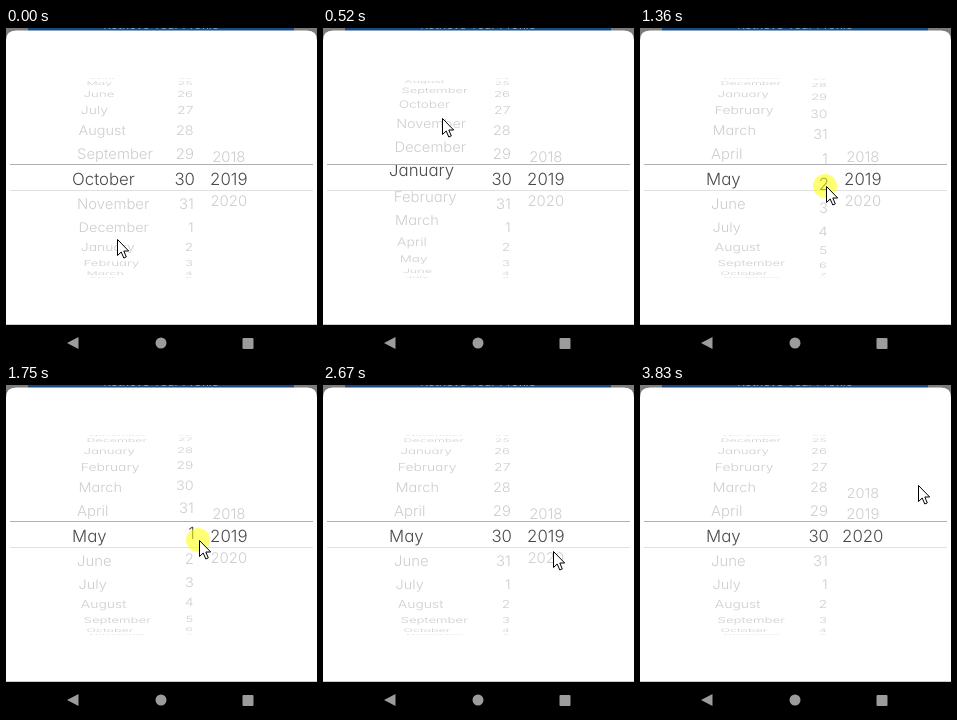
Recreate the animation shown at these times as an HTML page. Size 311x329 px, loop 3900 ms.

```html
<!DOCTYPE html>
<html lang="en">
<head>
<meta charset="utf-8">
<title>Date picker</title>
<style>
  html, body { margin: 0; width: 100%; height: 100%; overflow: hidden; background: #fff; }
  svg { display: block; width: 311px; height: 329px; }
  text { font: 300 15px Inter, "Open Sans", sans-serif; font-feature-settings: "cv11"; text-rendering: geometricPrecision; }
  .outer { fill: #cdcdcd; }
  .inner { fill: #4a4a4a; }
</style>
</head>
<body>
<svg viewBox="0 0 311 329">
  <defs>
    <clipPath id="outside"><path d="M0 48H311V136H0ZM0 163H311V252H0Z"/></clipPath>
    <clipPath id="band"><path d="M0 137H311V163H0Z"/></clipPath>
  </defs>
  <rect width="311" height="40" fill="#7c7c7c"/>
  <rect x="22" width="266" height="20" fill="#164a80"/>
  <text x="155" y="1" text-anchor="middle" style="font-size:12px;font-weight:400" fill="#8ea5bd">Retrieve Your Profile</text>
  <path d="M0 297V12.4Q0 2.4 10 2.4H301Q311 2.4 311 12.4V297Z" fill="#fff"/>
  <g id="outer" class="outer" clip-path="url(#outside)"></g>
  <g id="inner" class="inner" clip-path="url(#band)"></g>
  <path d="M4 136.5H307" stroke="#b0b0b0"/>
  <path d="M4 162.5H307" stroke="#e0e0e0"/>
  <rect y="296.8" width="311" height="33" fill="#000"/>
  <g fill="#9c9c9c">
    <path d="M61 315L72.5 309V321Z"/>
    <circle cx="155" cy="315" r="5.5"/>
    <rect x="236.5" y="310" width="11" height="11" rx="1"/>
  </g>
  <circle id="touch" r="12" fill="#ff0" opacity=".55"/>
  <path id="cursor" d="M.5 .5V16.5L4.2 13L6.8 19L9.3 17.9L6.8 12H11.7Z" fill="#fff" stroke="#000"/>
</svg>
<script>
// All motion is measured in ticks, the steps at which the picture changes
const LOOP = 3900, TICK = 76.5, LEAD = 26, LAST = 50;
const CENTER = 150, RADIUS = 102, MAGNIFY = 1.12;

const MONTHS = ['January', 'February', 'March', 'April', 'May', 'June', 'July',
  'August', 'September', 'October', 'November', 'December'];
const wrap = (i, n) => ((i % n) + n) % n;
const clamp = p => Math.min(1, Math.max(0, p));

// Share of an eased move from tick a to tick b that is done at tick n
const eased = (n, a, b) => .5 - .5 * Math.cos(Math.PI * clamp((n - a) / (b - a)));

const wheels = [
  { label: i => MONTHS[wrap(i, 12)], x: 70.5, anchor: 'start', vanish: 130, middle: 108, step: 14.2,
    value: n => 9 + 7 * eased(n, .4, 14.1) },
  { label: i => wrap(i, 31) + 1, x: 188, anchor: 'end', vanish: 180, middle: 180, step: 14.2,
    value: n => 29 + 3.3 * (eased(n, 15, 19) - eased(n, 18.8, 29)) },
  { label: i => i >= 0 && i < 3 ? 2018 + i : '', x: 222.8, anchor: 'middle', vanish: 222.8, middle: 222.8, step: 12.4,
    value: n => 1 - 1.1 * eased(n, 37, 40) + 2.1 * eased(n, 40, 44.7) }
];

// Turning points of the pointer: tick, x, y
const pointer = [[1, 111, 211], [7, 119, 90], [13, 188, 200], [15, 186, 212], [20, 186, 122],
  [23, 193, 155], [27, 194, 208], [35, 230, 166], [40, 230, 204], [42, 232, 182],
  [45, 234, 112], [50, 278, 100]];
const presses = [[2, 6], [16, 27], [38, 45]];

const $ = id => document.getElementById(id);

function pointerAt(n) {
  const next = Math.max(1, pointer.findIndex(k => k[0] >= n));
  const [a, ax, ay] = pointer[next - 1], [b, bx, by] = pointer[next];
  const p = clamp((n - a) / (b - a));
  return [ax + (bx - ax) * p, ay + (by - ay) * p];
}

// Project the items onto the face of a cylinder
function wheelText(w, value) {
  let out = '';
  for (let i = Math.ceil(value - 6.3); i <= value + 6.3; i++) {
    const angle = (i - value) * w.step * Math.PI / 180;
    const c = Math.cos(angle);
    if (c <= .02) continue;
    const y = CENTER + RADIUS * Math.sin(angle) / (1 + .025 * (1 - c));
    const sx = 1 / (1 + .3 * (1 - c));
    out += `<text x="${w.x - w.vanish}" y="6.2" text-anchor="${w.anchor}" ` +
      `transform="translate(${w.vanish} ${y}) scale(${sx} ${c})">${w.label(i)}</text>`;
  }
  return out;
}

function draw(n) {
  let outer = '', inner = '';
  for (const w of wheels) {
    const text = wheelText(w, w.value(n));
    outer += text;
    inner += `<g transform="translate(${w.middle} ${CENTER}) scale(${MAGNIFY}) translate(${-w.middle} ${-CENTER})">${text}</g>`;
  }
  $('outer').innerHTML = outer;
  $('inner').innerHTML = inner;
  const [x, y] = pointerAt(n);
  $('cursor').setAttribute('transform', `translate(${x} ${y})`);
  $('touch').setAttribute('transform', `translate(${x - 1} ${y})`);
  $('touch').style.display = presses.some(([a, b]) => n >= a && n <= b) ? '' : 'none';
}

let shown = -1;
const began = performance.now();
function tick() {
  const t = (performance.now() - began) % LOOP;
  const n = Math.min(LAST, Math.floor((t + LEAD) / TICK));
  if (n !== shown) draw(shown = n);
  requestAnimationFrame(tick);
}
tick();
</script>
</body>
</html>
```
